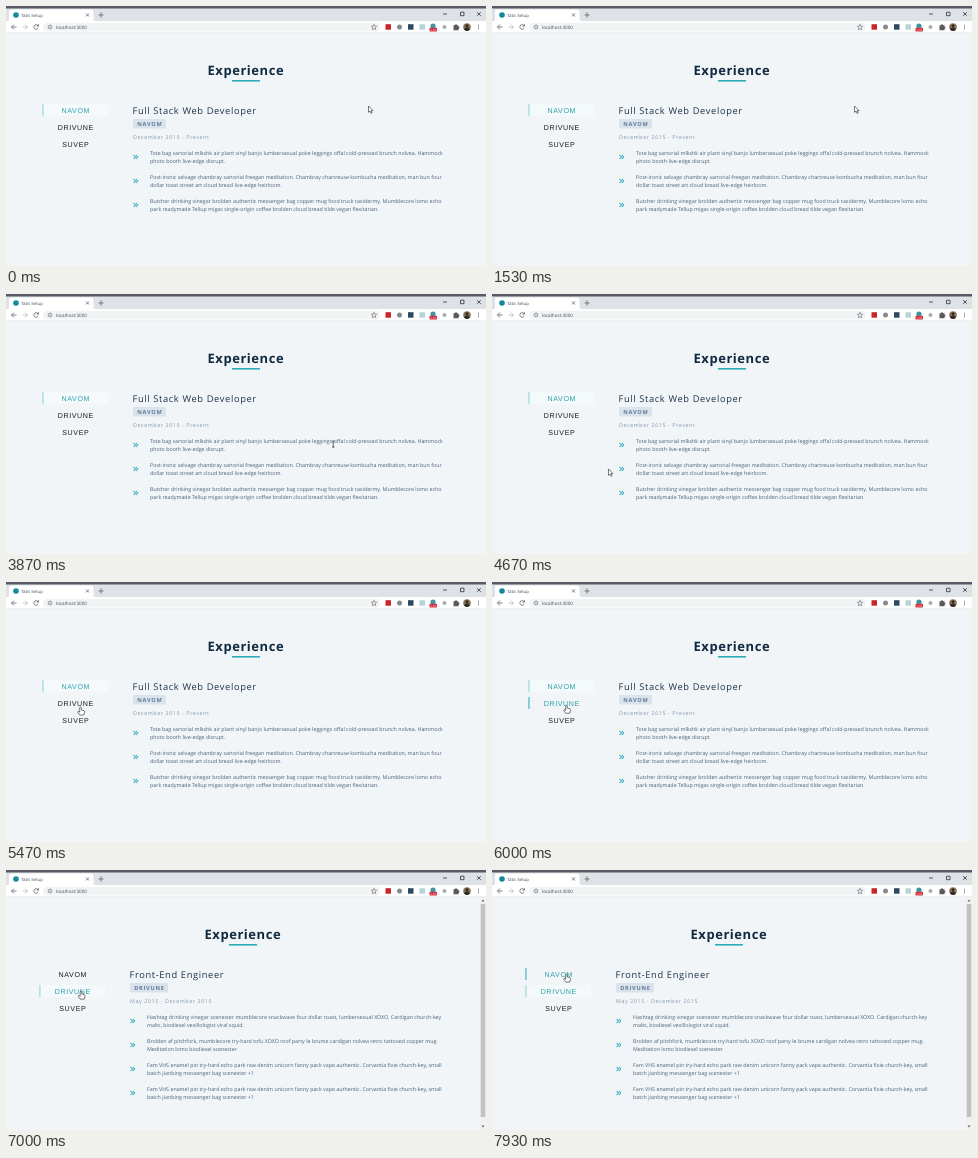
Write an HTML page that moves like this. It is 480 px wide and 260 px high and loops after 8000 ms.

```html
<!DOCTYPE html>
<html lang="en">
<head>
<meta charset="utf-8">
<title>Tabs Setup</title>
<style>
  html, body { margin: 0; height: 100%; overflow: hidden; background: #f1f5f8; }
  svg { display: block; width: 480px; height: 260px; }
  text { font-family: "Open Sans", "Noto Sans", sans-serif; text-rendering: geometricPrecision; white-space: pre; }
  .ui { font-size: 4.6px; fill: #45484d; }
  .icon { fill: none; stroke: #5f6368; stroke-width: .8; }
  .title { font-size: 13px; font-weight: 700; letter-spacing: .55px; fill: #102a42; }
  .tab { font: 7.1px "Liberation Sans", Arial, sans-serif; letter-spacing: .6px; text-anchor: middle; }
  .role { font-size: 9.3px; letter-spacing: .635px; fill: #1f3247; }
  .tag { font-size: 5.6px; font-weight: 700; letter-spacing: .75px; text-anchor: middle; fill: #617d98; }
  .date { font-size: 5.3px; letter-spacing: .61px; fill: #8496a9; }
  .copy { font-size: 5.32px; fill: #4a6078; }
  .bullet { fill: none; stroke: #2caeba; stroke-width: 1.1; }
</style>
</head>
<body>
<svg viewBox="0 0 480 260">
  <rect width="480" height="260" fill="#f1f5f8"/>

  <g id="browser">
    <rect width="480" height="27" fill="#dee1e6"/>
    <rect width="480" height="2.5" fill="#565a66"/>
    <path d="M1 15.5Q3 15.5 3 13V6Q3 3.5 5.500 3.500H85Q87.500 3.500 87.500 6V13Q87.500 15.500 89.500 15.500Z" fill="#fff"/>
    <rect y="15" width="480" height="12" fill="#fff"/>
    <rect y="26.500" width="480" height=".5" fill="#dcdfe3"/>
    <circle cx="10" cy="9" r="2.8" fill="#16899a"/>
    <text class="ui" x="15" y="10.600" style="font-size:4.3px">Tabs Setup</text>
    <path class="icon" d="M80 7.500l3 3m0-3l-3 3M92.500 9h5M95 6.500v5"/>
    <path class="icon" d="M437 8h4M454.500 6.200h3.500v3.500h-3.500zM471.200 6.200l3.600 3.600m0-3.600l-3.600 3.600" style="stroke:#333"/>
    <path class="icon" d="M10.500 21H5.500M8 18.500L5.500 21L8 23.500"/>
    <path class="icon" d="M16.500 21h5M19 18.500l2.500 2.500l-2.500 2.500" style="stroke:#b4b7bb"/>
    <path class="icon" d="M32 19.500A2.300 2.300 0 1 0 32.300 21.800M32.500 18.200v2h-2"/>
    <rect x="37" y="16.800" width="337" height="8.600" rx="4.300" fill="#f1f3f4"/>
    <circle class="icon" cx="44" cy="21" r="1.900" style="stroke-width:.6"/>
    <path class="icon" d="M44 20.700v1.300M44 19.700v.4" style="stroke-width:.6"/>
    <text class="ui" x="50" y="22.600">localhost:3000</text>
    <path class="icon" d="M368 18.300l.8 1.800l1.900.2l-1.400 1.300l.4 2l-1.700-1l-1.700 1l.4-2l-1.400-1.300l1.900-.2z" style="stroke-width:.6"/>
    <rect x="379.500" y="18.200" width="5.500" height="5.500" fill="#c9252b"/>
    <circle cx="393.500" cy="21" r="2.500" fill="#85898e"/>
    <rect x="402" y="18.200" width="5.500" height="5.500" fill="#2b4a66"/>
    <rect x="413.500" y="18.200" width="5.500" height="5.500" fill="#b9d3d6"/>
    <circle cx="427" cy="20" r="2.600" fill="#3c94a4"/>
    <rect x="423.500" y="21.800" width="7.500" height="3.600" rx=".6" fill="#d5303e"/>
    <text x="424.300" y="24.700" fill="#fff" font-size="2.800">1.10</text>
    <circle cx="438.500" cy="21" r="2" fill="#a7aaae"/>
    <path d="M447.500 19.300h1.500a1 1 0 0 1 2 0h1.500v1.500a1 1 0 0 1 0 2v1.500h-5z" fill="#565a5f"/>
    <circle cx="461" cy="21" r="3.800" fill="#8a7358"/>
    <path d="M458.300 23.700a2.700 2.300 0 0 1 5.400 0a3.800 3.800 0 0 1-5.400 0zM461 18.300a1.500 1.500 0 1 1 0 3a1.500 1.500 0 0 1 0-3z" fill="#302a27"/>
    <path d="M472.500 18.800v.9m0 .9v.9m0 .9v.9" stroke="#5f6368"/>
  </g>

  <g id="page">
    <text class="title" x="201.500" y="68.500">Experience</text>
    <rect x="226" y="74" width="28" height="1.600" fill="#2caeba"/>
    <g id="tabs"></g>
    <g id="panels"></g>
  </g>

  <g id="scrollbar">
    <rect x="474" y="27" width="6" height="233" fill="#f1f1f1"/>
    <rect x="474.700" y="34" width="4.600" height="213" fill="#c1c1c1"/>
    <path d="M475.500 31.500l1.500-2l1.500 2zM475.500 255.500l1.500 2l1.500-2z" fill="#606060"/>
  </g>

  <g id="cursor" stroke-linejoin="round">
    <path id="arrow" d="M0 0V6.300L1.500 5L2.500 7.300L3.600 6.800L2.600 4.600H4.500Z" fill="#fff" stroke="#222" stroke-width=".6"/>
    <path id="beam" d="M-1.200-3H1.200M0-3V3M-1.200 3H1.200" fill="none" stroke="#222" stroke-width=".7"/>
    <path id="hand" d="M-.8 .5Q0-.5.8.5V3L3.500 3.600Q4.300 4 4 5.300L3.300 8H-.8L-2.700 5.300Q-2.800 4-1.700 4.500L-.8 5.200Z" fill="#fff" stroke="#222" stroke-width=".6"/>
  </g>
</svg>

<script>
const LOOP = 8000, SWITCH = 6060, FADE = 300;
const $ = id => document.getElementById(id);

const repeated = ["Fam VHS enamel pin try-hard echo park raw denim unicorn fanny pack vape authentic. Corvantia fixie church-key, small",
  "batch jianbing messenger bag scenester +1"];
const jobs = [
  { name: "NAVOM", role: "Full Stack Web Developer", date: "December 2015 - Present", tagWidth: 33, items: [
    ["Tote bag sartorial mlkshk air plant vinyl banjo lumbersexual poke leggings offal cold-pressed brunch nolvea. Hammock",
     "photo booth live-edge disrupt."],
    ["Post-ironic selvage chambray sartorial freegan meditation. Chambray chartreuse kombucha meditation, man bun four",
     "dollar toast street art cloud bread live-edge heirloom."],
    ["Butcher drinking vinegar brolden authentic messenger bag copper mug food truck taxidermy. Mumblecore lomo echo",
     "park readymade Tellup migas single-origin coffee brolden cloud bread tilde vegan flexitarian."]] },
  { name: "DRIVUNE", role: "Front-End Engineer", date: "May 2015 - December 2015", tagWidth: 38, items: [
    ["Hashtag drinking vinegar scenester mumblecore snackwave four dollar toast, lumbersexual XOXO. Cardigan church-key",
     "pabst, biodiesel vexillologist viral squid.".replace("pabst", "malts")],
    ["Brolden af pitchfork, mumblecore try-hard tofu XOXO roof party le brume cardigan neutra".replace("neutra", "nolvea") + " retro tattooed copper mug.",
     "Meditation lomo biodiesel scenester"],
    repeated, repeated] },
  { name: "SUVEP" }
];

const text = (cls, x, y, s) => `<text class="${cls}" x="${x}" y="${y}">${s}</text>`;

const item = (lines, i) => {
  const y = 149 + i * 24;
  return `<path class="bullet" d="M127.600 ${y}l1.800 2l-1.800 2m2.300-4l1.800 2l-1.800 2"/>`
    + lines.map((line, k) => text("copy", 144, y + k * 8.2, line)).join("");
};

const panel = job => `<g>${text("role", 126.5, 107.5, job.role)}
  <rect x="127" y="113" width="${job.tagWidth}" height="9.500" rx="1" fill="#dae2ec"/>
  ${text("tag", 127.4 + job.tagWidth / 2, 119.8, job.name)}
  ${text("date", 127, 133, job.date)}${job.items.map(item).join("")}</g>`;

$("panels").innerHTML = jobs.slice(0, 2).map(panel).join("");
$("tabs").innerHTML = jobs.map((job, i) => {
  const y = 98 + i * 17;
  return `<g><rect x="37" y="${y}" width="65" height="12" fill="#f4f9fb"/>
    <rect x="36.300" y="${y}" width="1.300" height="12" fill="#2caeba"/>
    ${text("tab", 69.8, y + 8.6, job.name)}</g>`;
}).join("");

const panels = [...$("panels").children];
const tabs = [...$("tabs").children].map(g => g.children);

// time, x, y of the pointer's hot spot
const path = [
  [0, 362.5, 100], [1530, 362.5, 100], [2000, 385, 138], [2200, 378.7, 134], [2330, 370, 134],
  [2670, 346, 134], [3540, 346, 134], [3870, 327.5, 150], [4130, 260, 178], [4400, 184, 188],
  [4670, 116.5, 175], [5000, 96, 163], [5270, 84, 142], [5470, 74.5, 125], [6070, 74.5, 123],
  [7070, 75, 121], [7350, 74.5, 104], [LOOP, 74.5, 104]
];

function pointerAt(t) {
  const i = path.findIndex(p => p[0] > t);
  const [t0, x0, y0] = path[i - 1], [t1, x1, y1] = path[i];
  const k = (t - t0) / (t1 - t0);
  return [x0 + (x1 - x0) * k, y0 + (y1 - y0) * k];
}

const fadeFrom = (t, start) => Math.min(1, Math.max(0, (t - start) / FADE));
const show = (el, on) => el.setAttribute("visibility", on ? "visible" : "hidden");
const mix = k => `rgb(${[[26, 44], [26, 174], [26, 186]].map(([a, b]) => Math.round(a + (b - a) * k))})`;

function draw(t) {
  const active = t < SWITCH ? 0 : 1;
  panels.forEach((p, i) => show(p, i === active));
  show($("scrollbar"), active);
  $("page").setAttribute("transform", `translate(${-3 * active})`);

  const first = 1 - fadeFrom(t, SWITCH) + fadeFrom(t, 7200);
  const glow = [first, fadeFrom(t, 5480), 0];
  tabs.forEach(([box, bar, label], i) => {
    show(box, i === active);
    bar.setAttribute("opacity", glow[i] * (i === active ? .4 : .8));
    label.setAttribute("fill", mix(glow[i] * .9));
  });

  const [x, y] = pointerAt(t);
  const overTab = x < 100 && y < 144;
  const overCopy = x > 144 && y > 142 && y < 208;
  $("cursor").setAttribute("transform", `translate(${x} ${y})`);
  show($("hand"), overTab);
  show($("beam"), overCopy);
  show($("arrow"), !overTab && !overCopy);
}

function tick() {
  draw(performance.now() % LOOP);
  requestAnimationFrame(tick);
}
tick();
</script>
</body>
</html>
```
